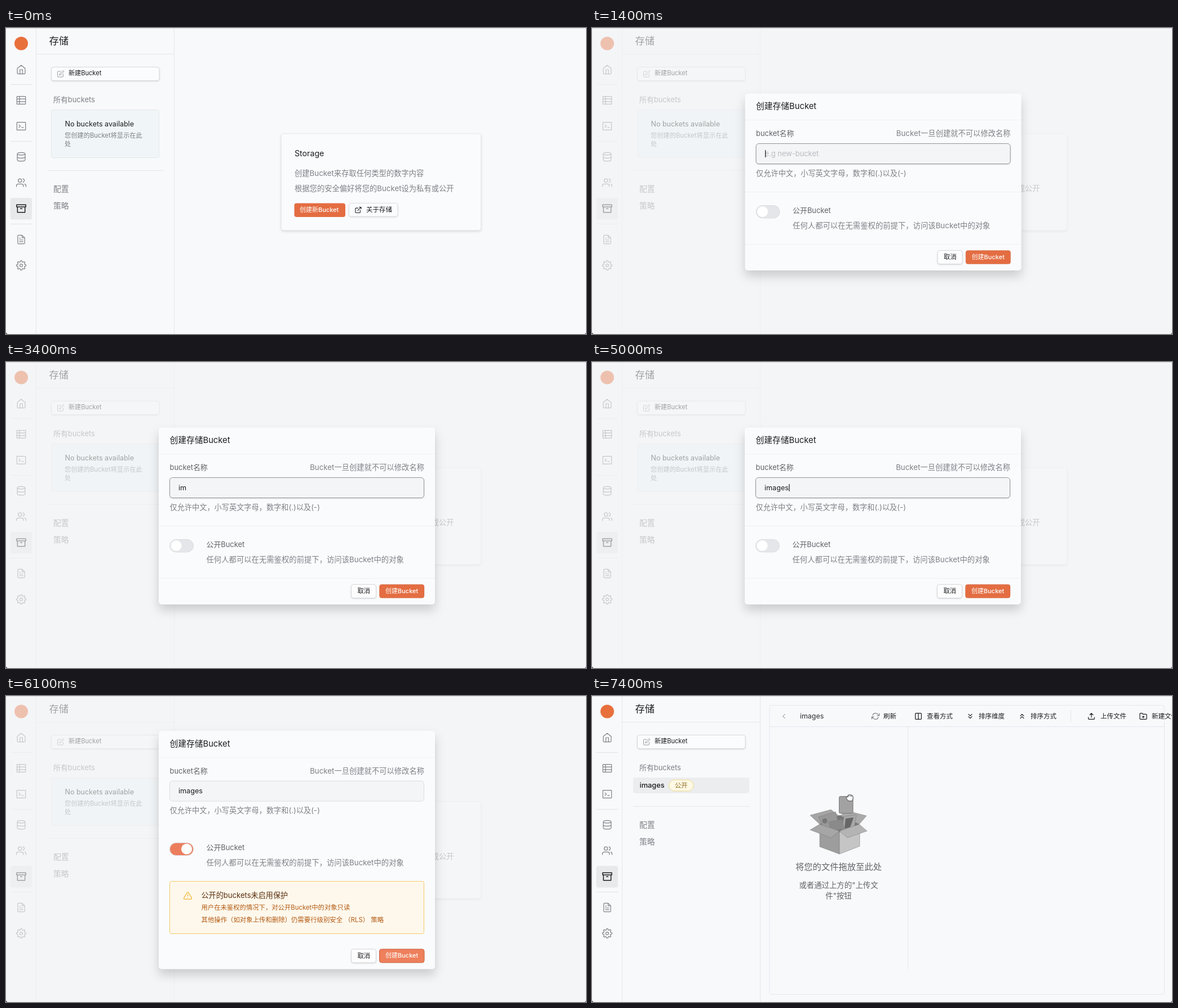
Recreate the animation shown at these times as an HTML page. Size 1029 by 544 pixels, loop 8.9 s.

```html
<!DOCTYPE html>
<html lang="zh-CN">
<head>
<meta charset="utf-8">
<title>存储</title>
<style>
  html, body { margin: 0; width: 100%; height: 100%; overflow: hidden; background: #f8f9fb; }
  svg { display: block; font-family: Inter, "Noto Sans CJK SC", "Noto Sans CJK", sans-serif; }
  text { white-space: pre; }
  .card { filter: drop-shadow(0 2px 2px rgba(0, 0, 0, .12)); }
  .raised { filter: drop-shadow(0 1px 1px rgba(0, 0, 0, .14)); }
  .dialog { filter: drop-shadow(0 10px 9px rgba(0, 0, 0, .17)); }
</style>
</head>
<body>
<svg id="stage" width="1029" height="544" viewBox="0 0 1029 544"></svg>
<script>
const LOOP = 8900;
const INK = '#1c1d1f', GREY = '#7d8186', MID = '#606468', LINE = '#e4e7ea';
const ORANGE = [228, 109, 66], ORANGE_HOVER = [238, 128, 92];
const TOGGLE_OFF = [228, 230, 233], TOGGLE_ON = [236, 126, 93];

const gear = 'M' + Array.from({ length: 96 }, (_, i) => {
  const a = i / 96 * 2 * Math.PI, r = 9.6 + 1.5 * Math.tanh(2 * Math.cos(8 * a));
  return (12 + r * Math.cos(a)).toFixed(2) + ' ' + (12 + r * Math.sin(a)).toFixed(2);
}).join('L') + 'zM8.8 12a3.2 3.2 0 1 0 6.4 0a3.2 3.2 0 1 0-6.4 0';

// Icon outlines on a 24 x 24 grid.
const ICONS = {
  home: 'M3 9l9-7 9 7v11a2 2 0 0 1-2 2H5a2 2 0 0 1-2-2zM9 22V12h6v10',
  table: 'M3 3h18a1 1 0 0 1 1 1v16a1 1 0 0 1-1 1H3a1 1 0 0 1-1-1V4a1 1 0 0 1 1-1zM2 9h20M2 15h20M8 3v18',
  terminal: 'M3 3h18a1 1 0 0 1 1 1v16a1 1 0 0 1-1 1H3a1 1 0 0 1-1-1V4a1 1 0 0 1 1-1zM7 9l3 3-3 3M13 15h4',
  database: 'M3 5a9 3 0 0 0 18 0a9 3 0 0 0-18 0v14a9 3 0 0 0 18 0V5M3 12a9 3 0 0 0 18 0',
  users: 'M17 21v-2a4 4 0 0 0-4-4H5a4 4 0 0 0-4 4v2M5 7a4 4 0 1 0 8 0a4 4 0 1 0-8 0M23 21v-2a4 4 0 0 0-3-3.9M16 3.1a4 4 0 0 1 0 7.8',
  archive: 'M21 8v13H3V8M1 3h22v5H1zM10 12h4',
  file: 'M14 2H6a2 2 0 0 0-2 2v16a2 2 0 0 0 2 2h12a2 2 0 0 0 2-2V8zM14 2v6h6M16 13H8M16 17H8M10 9H8',
  gear,
  edit: 'M11 4H4a2 2 0 0 0-2 2v14a2 2 0 0 0 2 2h14a2 2 0 0 0 2-2v-7M18.5 2.5a2.1 2.1 0 0 1 3 3L12 15l-4 1 1-4z',
  external: 'M18 13v6a2 2 0 0 1-2 2H5a2 2 0 0 1-2-2V8a2 2 0 0 1 2-2h6M15 3h6v6M10 14L21 3',
  warning: 'M10.3 3.9L1.8 18a2 2 0 0 0 1.7 3h17a2 2 0 0 0 1.7-3L13.7 3.9a2 2 0 0 0-3.4 0zM12 9v4M12 17h.01',
  refresh: 'M23 4v6h-6M1 20v-6h6M3.5 9a9 9 0 0 1 14.9-3.4L23 10M1 14l4.6 4.4A9 9 0 0 0 20.5 15',
  columns: 'M5 3h14a2 2 0 0 1 2 2v14a2 2 0 0 1-2 2H5a2 2 0 0 1-2-2V5a2 2 0 0 1 2-2zM12 3v18',
  down: 'M7 13l5 5 5-5M7 6l5 5 5-5',
  up: 'M17 11l-5-5-5 5M17 18l-5-5-5 5',
  back: 'M15 18l-6-6 6-6',
  upload: 'M21 15v4a2 2 0 0 1-2 2H5a2 2 0 0 1-2-2v-4M17 8l-5-5-5 5M12 3v12',
  folder: 'M22 19a2 2 0 0 1-2 2H4a2 2 0 0 1-2-2V5a2 2 0 0 1 2-2h5l2 3h9a2 2 0 0 1 2 2zM12 11v6M9 14h6'
};

const icon = (name, cx, cy, scale, color, width = 1.2) =>
  `<path d="${ICONS[name]}" transform="translate(${cx - 12 * scale} ${cy - 12 * scale}) scale(${scale})" fill="none"
    stroke="${color}" stroke-width="${width / scale}" stroke-linecap="round" stroke-linejoin="round"/>`;
// y is the optical middle of the line.
const text = (str, x, y, size, color, attrs = '') =>
  `<text x="${x}" y="${y + size * .36}" font-size="${size}" fill="${color}" ${attrs}>${str}</text>`;
const rect = (x1, y1, x2, y2, r, fill, stroke = 'none', attrs = '') =>
  `<rect x="${x1}" y="${y1}" width="${x2 - x1}" height="${y2 - y1}" rx="${r}" fill="${fill}" stroke="${stroke}" ${attrs}/>`;
const line = (x1, y1, x2, y2, color = LINE) => `<path d="M${x1} ${y1}L${x2} ${y2}" stroke="${color}"/>`;
const poly = (points, fill) => `<polygon points="${points}" fill="${fill}" stroke="#777" stroke-width=".5"/>`;
const group = (id, body, attrs = '') => `<g id="${id}" ${attrs}>${body}</g>`;
const medium = 'font-weight="500"';

const navIcons = [['home', 74], ['table', 128.5], ['terminal', 174.5], ['database', 229], ['users', 275],
  ['archive', 321], ['file', 376], ['gear', 422]];

const sidebar =
  line(53.5, 0, 53.5, 544) + line(298.5, 0, 298.5, 544) + line(54, 46.5, 298, 46.5) +
  [100.5, 201.5, 348.5].map(y => line(8, y, 46, y, '#dfe2e5')).join('') +
  '<circle cx="27" cy="27.5" r="12" fill="#e8703c"/>' +
  rect(7.5, 302, 46, 340.5, 4, '#e7e9eb') +
  navIcons.map(([name, y]) => icon(name, 27, y, name === 'archive' ? .74 : .77,
    name === 'archive' ? INK : GREY, name === 'archive' ? 1.5 : 1.2)).join('') +
  text('存储', 76.5, 22.5, 17.3, INK) +
  rect(80.5, 69.5, 272, 93.5, 4, '#fbfcfd', '#d6dadd', 'class="raised"') +
  icon('edit', 97, 81.5, .55, '#96999d', 1) +
  text('新建Bucket', 111, 80.5, 11.1, INK) +
  text('所有buckets', 84, 127, 12.9, GREY);

const menu = dy => line(73, 253.5 + dy, 280, 253.5 + dy) +
  text('配置', 84, 286 + dy, 13.8, GREY) + text('策略', 84, 316.5 + dy, 13.8, GREY);

const emptyPage =
  rect(80.5, 145.5, 271.5, 230.5, 3, '#f0f5f7', '#e3e8ea') +
  text('No buckets available', 104.5, 170, 12.5, INK) +
  text('您创建的Bucket将显示在此', 104, 190.5, 11.25, GREY) +
  text('处', 104, 206, 11.25, GREY) + menu(0) +
  rect(488.5, 188, 842.5, 359.5, 4, '#fafbfd', '#e8eaed', 'class="card"') +
  text('Storage', 512, 222.5, 14.2, INK) +
  text('创建Bucket来存取任何类型的数字内容', 512, 258.5, 13.3, GREY) +
  text('根据您的安全偏好将您的Bucket设为私有或公开', 512, 285.5, 13.3, GREY) +
  rect(511.5, 311.5, 602, 336, 4, '', 'none', 'id="openButton"') +
  text('创建新Bucket', 521, 323.5, 11, '#fff', medium) +
  rect(608.5, 311.5, 695, 335, 4, '#fbfcfd', '#dcdfe2', 'class="raised"') +
  icon('external', 625, 323.5, .56, INK, 1.1) + text('关于存储', 639, 323, 11.5, INK);

const tools = [['refresh', 503, 517, '刷新', GREY], ['columns', 579, 594, '查看方式', INK], ['down', 671, 686, '排序维度', INK],
  ['up', 763, 778, '排序方式', INK], ['upload', 886, 902, '上传文件', INK], ['folder', 978, 993, '新建文件夹', INK]];

const carton =
  poly('387,212 424,202 439,214 404,228', '#a4a4a4') + poly('439,214 452,204 487,213 474,228', '#aaa') +
  poly('404,228 439,212 474,228 439,247', '#777') +
  poly('402,215 432,206 440,236 412,238', '#989898') + poly('447,214 469,211 465,236 443,239', '#a8a8a8') +
  poly('450,218 464,216 458,233 448,236', '#666') +
  '<circle cx="413" cy="222" r="4.5" fill="#777"/>' + poly('420,224 444,219 447,237 424,239', '#8a8a8a') +
  poly('404,229 439,242 439,281 404,268', '#9d9d9d') + poly('439,242 475,229 475,267 439,281', '#c5c5c5') +
  poly('404,228 439,240 424,252 387,238', '#a6a6a6') + poly('439,240 474,228 488,240 453,252', '#b4b4b4') +
  rect(438.5, 178.5, 463, 208.5, 2, '#a2a2a2', '#777') +
  '<path d="M454 186l-3-5 1-2 2 1v-4h2l1-1 2 1 2 0 2 2v5l-2 4zM456 176v3M459 176v3M461 176v3" fill="#fff" stroke="#444" stroke-width=".9" stroke-linejoin="round"/>';

const dropHint = text('将您的文件拖放至此处', 437.5, 303.5, 15.3, MID, 'text-anchor="middle"') +
  text('或者通过上方的"上传文', 437.5, 336, 13.4, MID, 'text-anchor="middle"') +
  text('件"按钮', 437.5, 355, 13.4, MID, 'text-anchor="middle"');

const bucketPage =
  rect(73, 145, 279, 173, 4, '#ebedef') + text('images', 84.5, 158.5, 12.8, INK, medium) +
  rect(136.5, 149, 180, 169, 10, '#fdf9e4', '#eed98f') + text('公开', 147, 158.5, 11.3, '#8f6a20') + menu(-57) +
  rect(315, 16.5, 1015.5, 530.5, 4, 'none', LINE) + line(315, 54.5, 1015, 54.5) +
  line(560.5, 55, 560.5, 485) + line(849.5, 24, 849.5, 47) +
  icon('back', 340.5, 36, .6, '#a9adb1') + text('images', 369, 35.5, 12.4, '#2c2e30') +
  tools.map(([name, ix, tx, label, color]) => icon(name, ix, 36, .6, color) + text(label, tx, 35.5, 11.5, INK)).join('') +
  group('skeleton', [60, 86.5, 113].map(y => rect(320, y, 555, y + 22.5, 3, 'url(#shimmer)')).join('')) +
  group('dropHint', dropHint) + group('carton', carton);

const formTop =
  text('创建存储Bucket', 290.5, 139, 14.75, INK) + line(271, 163.5, 761, 163.5, '#f1f3f5') +
  text('bucket名称', 290.5, 187.5, 12.9, MID) +
  text('Bucket一旦创建就不可以修改名称', 742, 187.5, 13.3, GREY, 'text-anchor="end"') +
  rect(290.5, 205.5, 741.5, 241.5, 5, '#f4f5f7', '#dadde0', 'id="field"') +
  text('e.g new-bucket', 306, 223, 12.9, '#b9bcc0', 'id="hint"') + text('', 306, 223, 12.6, INK, 'id="typed"') +
  rect(306, 217, 307.2, 230, 0, INK, 'none', 'id="caret"') +
  text('仅允许中文，小写英文字母，数字和(.)以及(-)', 290.5, 258, 13.2, GREY) +
  group('dividers', line(271, 291.5, 761, 291.5, '#eef0f2') + line(271, 384.5, 761, 384.5, '#eef0f2')) +
  rect(290.5, 315.5, 332.5, 338, 11.2, '', '#dcdee1', 'id="track"') +
  '<circle id="knob" cy="326.5" r="9.6" fill="#fff"/>' +
  text('公开Bucket', 355.5, 324, 12.9, MID) +
  text('任何人都可以在无需鉴权的前提下，访问该Bucket中的对象', 355.5, 351, 13.35, GREY);

const notice =
  rect(290.5, 329.5, 741.5, 422.5, 3, '#fef8ec', '#f5c766') + icon('warning', 322.5, 355, .68, '#f0b42c') +
  text('公开的buckets未启用保护', 346.5, 354.5, 13.1, '#5a2f0c') +
  text('用户在未鉴权的情况下，对公开Bucket中的对象只读', 346.5, 375.5, 11.35, '#b25a12') +
  text('其他操作（如对象上传和删除）仍需要行级别安全 （RLS） 策略', 346.5, 398, 11.4, '#b25a12');

const formButtons =
  rect(612.5, 395.5, 656.5, 419.5, 4, '#fdfdfe', '#d6d9dc', 'class="raised"') + text('取消', 623.5, 407, 11.3, INK) +
  rect(662.5, 395.5, 742, 419.5, 4, '', '#c9603c', 'id="createButton"') +
  text('创建Bucket', 673, 407, 11, '#fff', medium);

const stage = document.getElementById('stage');
stage.innerHTML =
  `<linearGradient id="shimmer"><stop stop-color="#f4f5f7"/><stop offset="1" stop-color="#e9ebee"/></linearGradient>` +
  rect(0, 0, 1029, 544, 0, '#f8f9fb') + sidebar + group('emptyPage', emptyPage) + group('bucketPage', bucketPage) +
  rect(0, 0, 1029, 544, 0, '#f3f4f6', 'none', 'id="veil"') +
  group('dialog', rect(271, 0, 761, 0, 5, '#fafbfd', 'none', 'id="panel" class="dialog"') +
    group('formTop', formTop) + group('notice', notice) + group('formButtons', formButtons)) +
  group('status', rect(-4, 524, 342, 548, 3, '#dee1e6') +
    text('Waiting for cfbnfgrdgsbjef7jpgj0.baseapi.test1.langnal.co...', 3, 536, 11.9, '#3f4347', 'font-family="Open Sans, sans-serif"')) +
  line(0, .5, 1029, .5, '#d9dbde') +
  '<path d="M0 540v4h4q-4 0-4-4M1029 541v3h-3q3 0 3-3" fill="#333"/>';

const el = {};
stage.querySelectorAll('[id]').forEach(node => el[node.id] = node);
const set = (id, attrs) => { for (const key in attrs) el[id].setAttribute(key, attrs[key]); };
const show = (id, on) => set(id, { visibility: on ? 'inherit' : 'hidden' });
const mix = (a, b, k) => `rgb(${a.map((v, i) => Math.round(v + (b[i] - v) * k))})`;
const within = (t, ...spans) => spans.some(([from, to]) => t >= from && t < to);
// First value holds before start; the rest follow at 100 ms intervals.
const steps = (t, start, values) =>
  values[Math.max(0, Math.min(values.length - 1, Math.floor((t - start) / 100) + 1))];

const keyTimes = [2700, 2900, 3600, 3700, 3900, 4000];

function render(t) {
  const opened = t < 6600;
  const expanded = within(t, [5200, 6800]);
  const shift = expanded ? 54.5 : 0;

  show('emptyPage', t < 6800);
  show('bucketPage', t >= 6800);
  show('skeleton', t < 7300);
  show('dropHint', t >= 7300);
  set('dropHint', { transform: `translate(0 ${t < 7400 ? -54 : 0})` });
  show('carton', t >= 7400);
  show('status', within(t, [6800, 7300]));
  set('openButton', { fill: mix(ORANGE, ORANGE_HOVER, steps(t, 700, [0, .5, 1])) });

  set('veil', { opacity: opened ? steps(t, 1200, [0, .15, .45, .62]) : steps(t, 6600, [.62, .62, .6, .56, .48, .37, .2, .07, 0]) });
  const scale = opened ? steps(t, 1200, [.95, .955, .985, 1]) : steps(t, 6600, [1, 1, .995, .985, .96, .95]);
  const drift = steps(t, 1200, [.6, .6, .6, .6, .6, 0]);
  show('dialog', within(t, [1200, 7000]));
  set('dialog', {
    opacity: opened ? steps(t, 1200, [0, .25, .8, 1]) : steps(t, 6600, [1, 1, .95, .7, .25, 0]),
    transform: `translate(${516 + drift} 274) scale(${scale}) translate(-516 -274)`
  });
  set('panel', { y: 116.5 - shift, height: 314.5 + 2 * shift });
  set('formTop', { transform: `translate(0 ${-shift})` });
  set('formButtons', { transform: `translate(0 ${shift})` });
  show('dividers', !expanded);
  show('notice', expanded);

  const count = keyTimes.filter(k => t >= k).length;
  el.typed.textContent = 'images'.slice(0, count);
  show('hint', !count);
  show('caret', within(t, [1300, 2100], [2600, 3400], [3600, 4500], [5000, 5200]));
  set('caret', { x: 306.5 + (count ? el.typed.getComputedTextLength() : 0) });
  const focused = t < 5200;
  set('field', { stroke: focused ? '#94979b' : '#dadde0', class: focused ? 'raised' : '' });

  const on = steps(t, 5200, [0, .1, .62, .95, 1]);
  set('track', { fill: mix(TOGGLE_OFF, TOGGLE_ON, on) });
  set('knob', { cx: 302 + 18.5 * on });
  const hover = t >= 6100;
  set('createButton', { fill: mix(ORANGE, ORANGE_HOVER, +hover), 'stroke-opacity': hover ? 1 : .35 });
}

function frame() {
  render(performance.now() % LOOP);
  requestAnimationFrame(frame);
}
frame();
</script>
</body>
</html>
```
